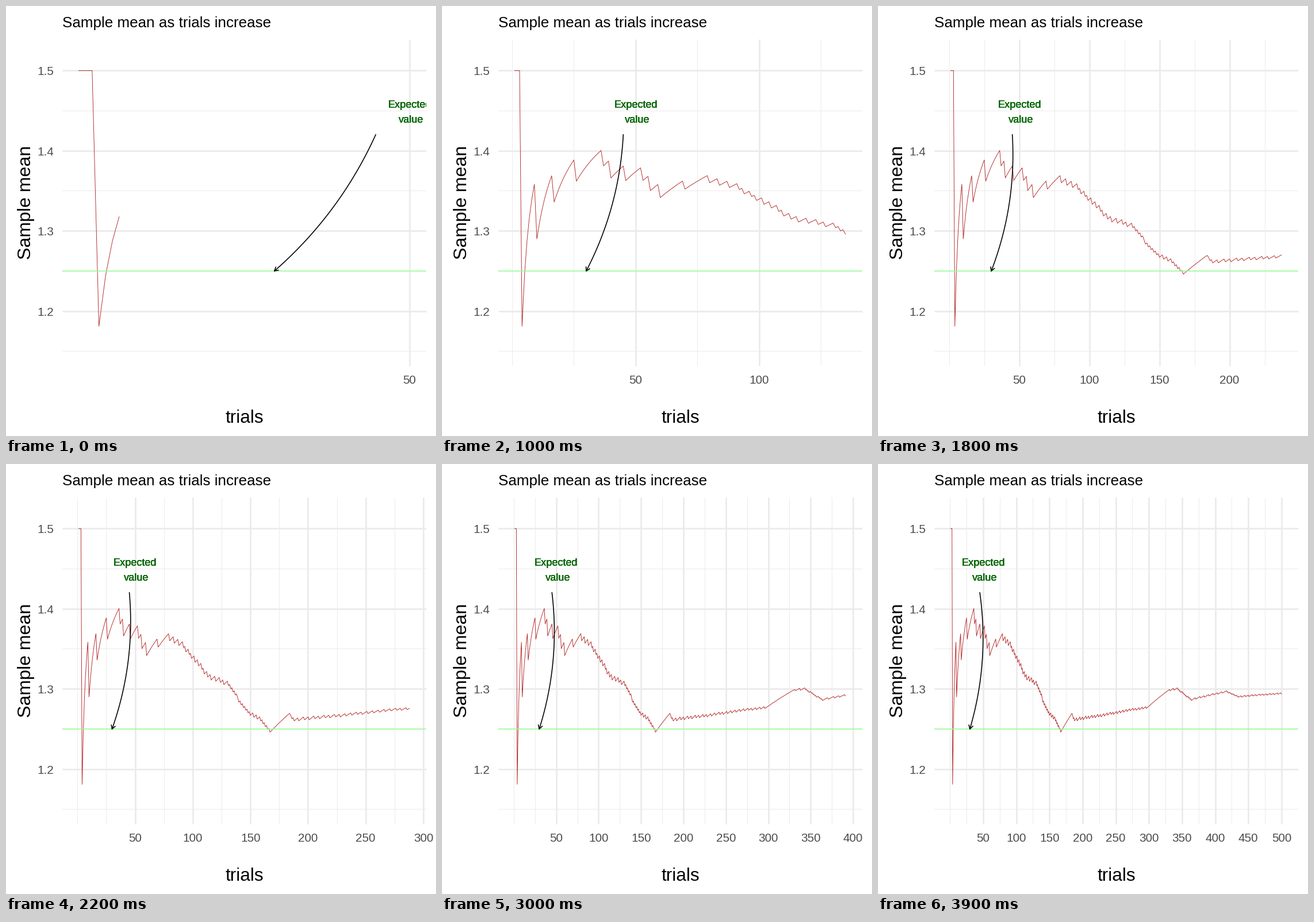
Animation, 748 px wide and 748 px high, one loop 5 s. Source, as a matplotlib script:

```python
import numpy as np
import matplotlib.pyplot as plt
from matplotlib.animation import FuncAnimation
from matplotlib.patches import Rectangle

plt.rcParams["font.family"] = "Liberation Sans"
plt.rcParams["path.simplify"] = False

SIZE, DPI = 748, 100
PX = 72 / DPI  # points per pixel
LEFT, RIGHT, TOP, BOTTOM = 98, 731, 58, 626
TRIALS, STEPS, FRAMES = 500, 40, 50
PAD = (RIGHT - LEFT) * 0.05 / 1.1
GRID, TICK, GREEN = "#EBEBEB", "#4D4D4D", "#006400"

# A few low points of the running mean: (trial, mean)
LOWS = [
    (4, 1.181), (10, 1.29), (17, 1.336), (26, 1.362), (37, 1.381),
    (40, 1.366), (53, 1.363), (60, 1.3415), (80, 1.36), (92, 1.3515),
    (99, 1.338), (116, 1.311), (131, 1.304), (150, 1.267), (159, 1.26),
    (167, 1.246), (185, 1.267), (188, 1.26), (228, 1.265), (296, 1.2755),
    (332, 1.2977), (344, 1.299), (364, 1.2855), (418, 1.296),
    (435, 1.2895), (500, 1.2935),
]


def running_mean(best=1.5, typical_loss=0.95):
    """Trials pay the best value, except evenly spaced losses before each low."""
    loss = np.zeros(TRIALS + 1)
    previous, total = 0, 0
    for low, mean in LOWS:
        needed = low * (best - mean) - total
        count = max(1, round(needed / typical_loss))
        at = np.rint(np.linspace(previous, low, count + 1)[1:]).astype(int)
        loss[at] = needed / count
        previous, total = low, total + needed
    n = np.arange(1, TRIALS + 1)
    return n, best - np.cumsum(loss[1:]) / n


def y_px(value):
    return 112.3 + (1.5 - value) * 1394.5


def x_px(trial, last):
    width = RIGHT - LEFT - 2 * PAD
    return LEFT + PAD - 0.4 + (trial - 1) * width / (last - 1)


def label(x, y, text, px, color="black", ha="center", va="baseline", **kw):
    return ax.text(x, y, text, fontsize=px * PX, color=color, ha=ha, va=va, **kw)


def curve(start, end, bend=0.054):
    """Quadratic arc bulging to the right of the chord."""
    chord = end - start
    control = (start + end) / 2 + 2 * bend * np.array([chord[1], -chord[0]])
    t = np.linspace(0, 1, 40)[:, None]
    return (1 - t) ** 2 * start + 2 * t * (1 - t) * control + t ** 2 * end, control


def arrow_head(tip, control, length=7):
    back = np.arctan2(*(control - tip)[::-1])
    barbs = [tip + length * np.array([np.cos(a), np.sin(a)])
             for a in (back - np.pi / 6, back + np.pi / 6)]
    return np.array([barbs[0], tip, barbs[1]])


def verticals(trials, last):
    return [[(x_px(t, last), TOP), (x_px(t, last), BOTTOM)] for t in trials]


fig = plt.figure(figsize=(SIZE / DPI, SIZE / DPI), dpi=DPI, facecolor="white")
ax = fig.add_axes([0, 0, 1, 1])
ax.set(xlim=(0, SIZE), ylim=(SIZE, 0))
ax.axis("off")
panel = Rectangle((LEFT, TOP), RIGHT - LEFT, BOTTOM - TOP, fc="none", ec="none")
ax.add_patch(panel)

label(98, 37, "Sample mean as trials increase", 26, ha="left")
label(415, 725, "trials", 31.7)
label(50, 341.5, "Sample mean", 32.2, ha="right", va="center", rotation=90)

ax.hlines([y_px(v) for v in (1.45, 1.35, 1.15)], LEFT, RIGHT, GRID, lw=PX,
          zorder=1)
minor = ax.vlines([], TOP, BOTTOM, GRID, lw=PX, zorder=1)
major = ax.vlines([], TOP, BOTTOM, GRID, lw=2.8 * PX, zorder=2)
for value in (1.5, 1.4, 1.3, 1.2):
    ax.hlines(y_px(value), LEFT, RIGHT, GRID, lw=2.8 * PX, zorder=2)
    label(83.5, y_px(value) + 8, f"{value}", 20.8, TICK, ha="right")

ticks = {t: label(0, 657, str(t), 20.8, TICK) for t in range(50, 501, 50)}
mean_line, = ax.plot([], [], color="#B22222", lw=0.9 * PX, zorder=3)
ax.hlines(y_px(1.25), LEFT, RIGHT, "#98FB98", lw=1.6 * PX, zorder=4)
# Overprinted for a heavier, darker look
notes = [label(0, y, text, 18.2, GREEN, zorder=5, clip_on=True)
         for y, text in ((176.5, "Expected"), (202.5, "value")) * 4]
shaft, = ax.plot([], [], color="black", lw=1.6 * PX, zorder=6)
head, = ax.plot([], [], color="black", lw=1.6 * PX, zorder=6)
for artist in (mean_line, shaft, head, *notes):
    artist.set_clip_path(panel)

trial, mean = running_mean()


def update(frame):
    step = min(frame, STEPS - 1)
    shown = min(TRIALS, int(1 + (step + 0.5) * (TRIALS - 1) / (STEPS - 1)))
    last = max(50, shown)
    edge = last + 0.05 * (last - 1)

    mean_line.set_data(x_px(trial[:shown], last), y_px(mean[:shown]))

    majors = [t for t in ticks if t <= edge]
    minors = [t for t in range(0, 501, 25) if t <= edge and t not in ticks]
    major.set_segments(verticals(majors, last))
    minor.set_segments(verticals(minors if len(majors) > 1 else [], last))
    for t, text in ticks.items():
        text.set_visible(t in majors)
        text.set_x(x_px(t, last))

    for note in notes:
        note.set_x(x_px(50, last) + (2.5 if note.get_text() == "value" else 0))

    start = np.array([x_px(45, last), y_px(1.42)])
    tip = np.array([x_px(30, last), y_px(1.25)])
    points, control = curve(start, tip)
    shaft.set_data(*points.T)
    head.set_data(*arrow_head(tip, control).T)
    return []


animation = FuncAnimation(fig, update, frames=FRAMES, interval=100,
                          repeat=True, blit=False)
plt.show()
```
